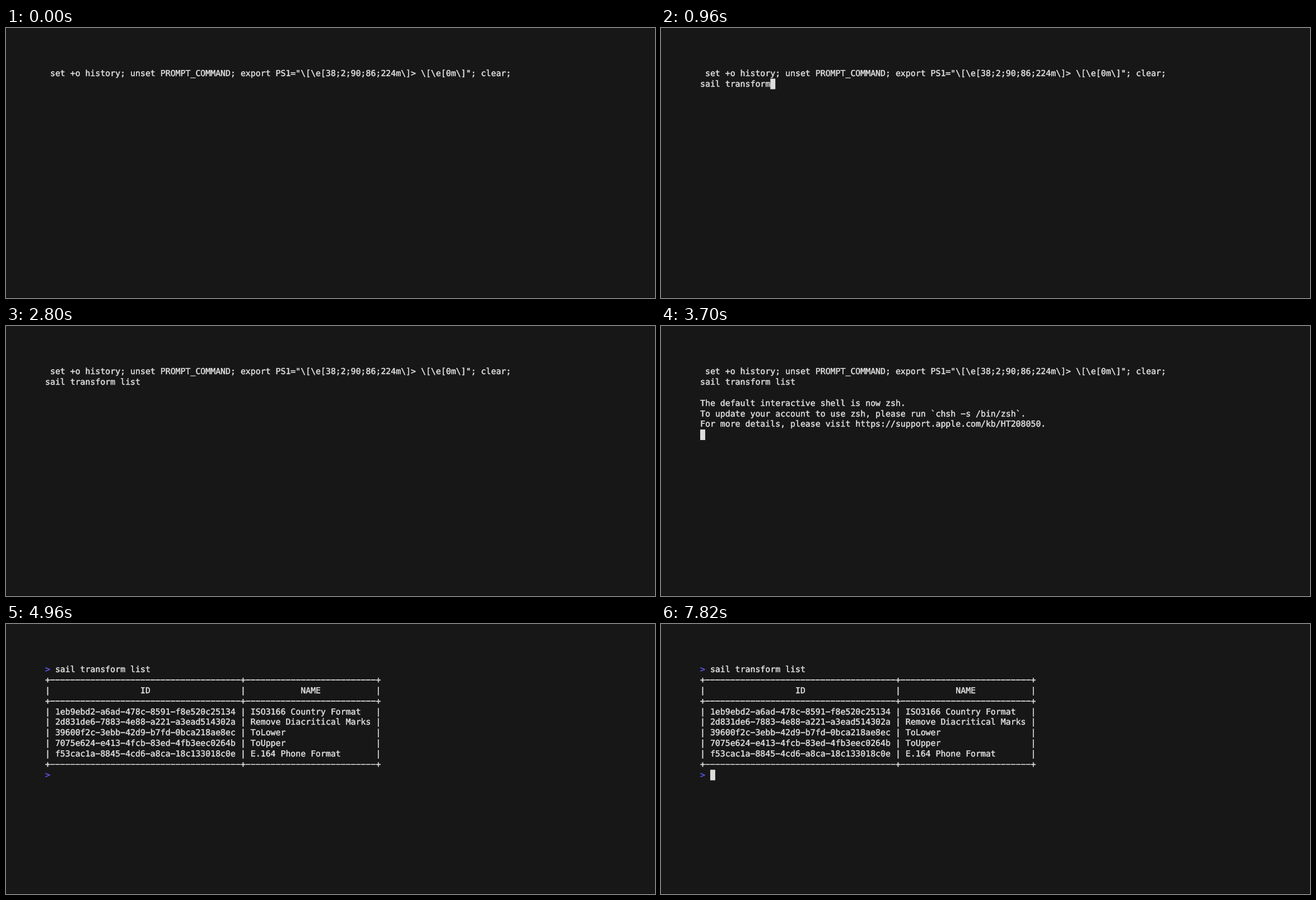
An HTML page for the animation above (8 s loop, 1159 px wide and 483 px high).

```html
<!DOCTYPE html>
<html lang="en">
<head>
<meta charset="utf-8">
<title>Terminal session</title>
<style>
  html, body { margin: 0; width: 100%; height: 100%; overflow: hidden; background: #171717; }
  svg { display: block; }
  text {
    font: 14.86px "DejaVu Sans Mono", monospace;
    fill: #dddddd;
    stroke: #dddddd;
    stroke-width: 0.5;
    white-space: pre;
    text-rendering: geometricPrecision;
  }
  .prompt { fill: #5a56e0; stroke: #5a56e0; }
  .rule { stroke: #dddddd; stroke-width: 1.6; stroke-dasharray: 8.3 0.647; }
</style>
</head>
<body>
<svg id="stage" width="1159" height="483" viewBox="0 0 1159 483">
  <rect width="1159" height="483" fill="#171717"/>
  <rect y="482" width="1159" height="1" fill="#0c0c0c"/>
  <g id="screen"></g>
  <rect id="cursor" width="8.95" height="18.9" fill="#dddddd"/>
</svg>
<script>
const LOOP = 8000;
const LEFT = 70, TOP = 71.7, CELL_W = 8.947, CELL_H = 18.9, BASE = 14.2;
const COMMAND = "sail transform list";
const SETUP = String.raw` set +o history; unset PROMPT_COMMAND; export PS1="\[\e[38;2;90;86;224m\]> \[\e[0m\]"; clear;`;
const NOTICE = [
  "The default interactive shell is now zsh.",
  "To update your account to use zsh, please run `chsh -s /bin/zsh`.",
  "For more details, please visit https://support.apple.com/kb/HT208050."
];
const TRANSFORMS = [
  ["1eb9ebd2-a6ad-478c-8591-f8e520c25134", "ISO3166 Country Format"],
  ["2d831de6-7883-4e88-a221-a3ead514302a", "Remove Diacritical Marks"],
  ["39600f2c-3ebb-42d9-b7fd-0bca218ae8ec", "ToLower"],
  ["7075e624-e413-4fcb-83ed-4fb3eec0264b", "ToUpper"],
  ["f53cac1a-8845-4cd6-a8ca-18c133018c0e", "E.164 Phone Format"]
];
// Moments at which the cursor flips while the shell is idle
const BLINKS = [1800, 2240, 2800, 3380, 4340, 4380, 4960, 5540, 6120, 6700, 7240, 7820];

const screen = document.getElementById("screen");
const cursor = document.getElementById("cursor");
const colX = col => LEFT + col * CELL_W;
const rowY = row => TOP + row * CELL_H;

function add(parent, tag, attrs) {
  const node = document.createElementNS("http://www.w3.org/2000/svg", tag);
  for (const key in attrs) node.setAttribute(key, attrs[key]);
  parent.appendChild(node);
  return node;
}

function print(parent, row, col, string, cls = "") {
  const node = add(parent, "text", { x: colX(col), y: rowY(row) + BASE, class: cls });
  node.textContent = string.replace(/-/g, "\u2212"); // terminal font has wide hyphens
  return node;
}

function border(parent, row) {
  const y = rowY(row) + BASE - 4.7;
  for (const col of [0, 39, 66]) print(parent, row, col, "+");
  for (const [from, to] of [[1, 39], [40, 66]]) {
    add(parent, "line", { x1: colX(from) + 0.3, x2: colX(to), y1: y, y2: y, class: "rule" });
  }
}

function tableRow(parent, row, id, name) {
  print(parent, row, 0, "| " + id.padEnd(36) + " | " + name.padEnd(24) + " |");
}

const group = () => add(screen, "g", {});
const before = group(), notice = group(), after = group(), table = group();

print(before, 0, 0, SETUP);
const typed = print(before, 1, 0, "");
NOTICE.forEach((line, i) => print(notice, 3 + i, 0, line));

print(after, 0, 0, ">", "prompt");
print(after, 0, 2, COMMAND);

border(table, 1);
tableRow(table, 2, " ".repeat(17) + "ID", " ".repeat(10) + "NAME");
border(table, 3);
TRANSFORMS.forEach(([id, name], i) => tableRow(table, 4 + i, id, name));
border(table, 9);
print(table, 10, 0, ">", "prompt");

// One key about every 51 ms, with a short hesitation before the last word
const keyTime = i => i === 14 ? 1040 : 300 + Math.floor(i * 2.56) * 20;

function typedCount(t) {
  let n = 0;
  while (n < COMMAND.length && t >= keyTime(n)) n++;
  return n;
}

function cursorCell(t, count) {
  if (t < 2240) return [1, count];
  if (t < 3700) return [2, 0];
  if (t < 3740) return [6, 0];
  if (t < 3760) return [8, 0];
  if (t < 4380) return [1, 0];
  return [10, 2];
}

const show = (node, on) => node.setAttribute("visibility", on ? "visible" : "hidden");

function draw(t) {
  const count = typedCount(t);
  const [row, col] = cursorCell(t, count);
  const flips = BLINKS.filter(time => t >= time).length;

  typed.textContent = COMMAND.slice(0, count);
  show(before, t < 3760);
  show(notice, t >= 3700 && t < 3760);
  show(after, t >= 3760);
  show(table, t >= 4380);
  cursor.setAttribute("x", colX(col));
  cursor.setAttribute("y", rowY(row));
  show(cursor, t >= 300 && flips % 2 === 0);
}

const start = performance.now();
function tick(now) {
  draw(Math.max(0, now - start) % LOOP);
  requestAnimationFrame(tick);
}
draw(0);
requestAnimationFrame(tick);
</script>
</body>
</html>
```
